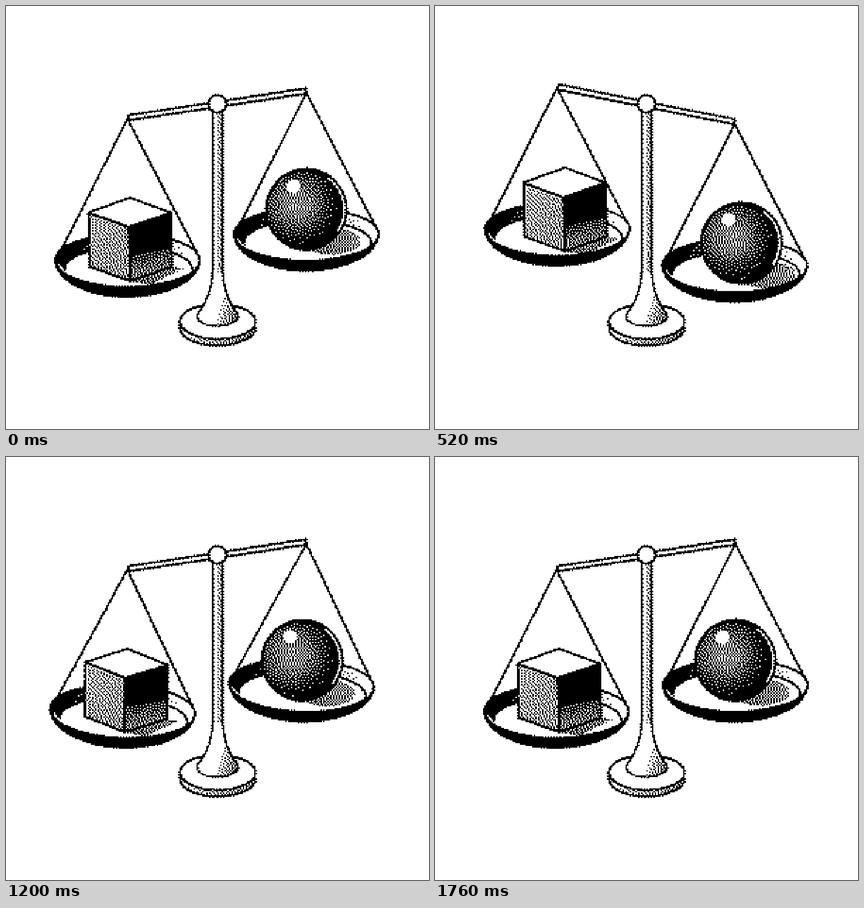
An HTML page with a canvas that plays this animation: 748 by 748 pixels, repeating every 2.12 s.

```html
<!DOCTYPE html>
<html lang="en">
<head>
<meta charset="utf-8">
<title>Balance scale</title>
<style>
  html, body { margin: 0; width: 100%; height: 100%; overflow: hidden; background: #fff; }
  canvas { display: block; width: 100vw; height: 100vh; image-rendering: pixelated; }
</style>
</head>
<body>
<canvas id="stage" width="300" height="300"></canvas>
<script>
const STAGE = 748, SIZE = 300, LOOP = 2120, STEP = 40, REST = 1760;
const HUB = { x: 374, y: 174 }, ARM = 159, DROP = 253, LINE = 3.9;
const ctx = document.getElementById('stage').getContext('2d', { willReadFrequently: true });
const TAU = Math.PI * 2, RAD = Math.PI / 180;

const clamp = v => Math.min(1, Math.max(0, v));
const ease = (t, from, to) => 0.5 - 0.5 * Math.cos(Math.PI * clamp((t - from) / (to - from)));

// Beam tilt and pan swing in degrees; slide and sink of the loads from 0 to 1.
function pose(t) {
  return {
    tilt: 8.7 - 19.9 * (ease(t, 0, 500) - ease(t, 620, 1200)),
    swing: -3.1 * ease(t, 700, 1120) + 6 * ease(t, 1120, 1400) - 2.9 * ease(t, 1400, REST),
    slide: ease(t, 0, 420) - ease(t, 720, 920),
    sink: ease(t, 360, 720) - ease(t, 930, 1200)
  };
}

// Samples a tone function (0 black, 1 white) along a gradient.
function shade(gradient, tone) {
  for (let i = 0; i <= 10; i++) {
    const v = Math.round(255 * clamp(tone(i / 10)));
    gradient.addColorStop(i / 10, `rgb(${v},${v},${v})`);
  }
  return gradient;
}
const linear = (x0, y0, x1, y1, tone) => shade(ctx.createLinearGradient(x0, y0, x1, y1), tone);

function paint(fill, width, stroke = '#000') {
  if (fill) { ctx.fillStyle = fill; ctx.fill(); }
  if (width) { ctx.strokeStyle = stroke; ctx.lineWidth = width; ctx.stroke(); }
}

function ellipse(x, y, rx, ry, fill, width) {
  ctx.beginPath();
  ctx.ellipse(x, y, rx, ry, 0, 0, TAU);
  paint(fill, width);
}

function arc(x, y, rx, ry, from, to, width) {
  ctx.beginPath();
  ctx.ellipse(x, y, rx, ry, 0, from, to);
  paint(null, width, '#fff');
}

function poly(points, fill, width) {
  ctx.beginPath();
  points.forEach(p => ctx.lineTo(p.x, p.y));
  ctx.closePath();
  paint(fill, width);
}

function string(x, y) {
  ctx.beginPath();
  ctx.moveTo(0, -DROP + 3);
  ctx.lineTo(x, y);
  paint(null, LINE);
}

function drawStand() {
  const x = 374.5;
  ctx.beginPath();
  ctx.ellipse(x, 570, 67, 31, 0, 0, Math.PI);
  ctx.lineTo(x - 67, 558);
  ctx.lineTo(x + 67, 558);
  paint(linear(x - 67, 0, x + 67, 0, s => 0.85 - 0.45 * s), LINE);
  ellipse(x, 558, 67, 31, '#fff', LINE);

  // Column with flared foot
  ctx.beginPath();
  ctx.moveTo(x - 9, 188);
  ctx.lineTo(x - 9, 468);
  ctx.bezierCurveTo(x - 10, 505, x - 24, 530, x - 35, 543);
  ctx.bezierCurveTo(x - 49, 574, x + 49, 574, x + 35, 543);
  ctx.bezierCurveTo(x + 24, 530, x + 10, 505, x + 9, 468);
  ctx.lineTo(x + 9, 188);
  ctx.closePath();
  ctx.save();
  ctx.clip();
  ctx.fillStyle = linear(x - 4, 0, x + 11, 0, s => 1 - 0.7 * s);
  ctx.fillRect(x - 15, 180, 30, 292);
  ctx.fillStyle = linear(x - 4, 545, x + 36, 556, s => 1 - 0.75 * s);
  ctx.fillRect(x - 45, 472, 90, 100);
  ctx.restore();
  paint(null, 3.4);
}

function drawBeam(tilt) {
  ctx.save();
  ctx.translate(HUB.x, HUB.y);
  ctx.rotate(-tilt * RAD);
  ctx.beginPath();
  ctx.rect(-ARM, -4.5, ARM * 2, 9);
  paint('#fff', LINE);
  ctx.restore();
  ellipse(HUB.x, 173, 16, 16, '#fff', LINE);
}

function drawPan(shadow) {
  string(-117, -19);
  string(123, -13);
  ctx.beginPath();
  ctx.ellipse(0, 0, 129, 66, 0, 0, Math.PI);
  paint('#000');
  ellipse(0, 0, 128, 47, linear(-129, 0, 129, 0, s => 1.3 * s - 0.2));
  ctx.save();
  ctx.clip();
  ellipse(2, 16, 113, 40, '#fff', LINE);
  ctx.clip();
  shadow();
  ctx.restore();
  ellipse(0, 0, 128, 47, null, LINE);
  arc(0, 0, 123, 45, 2.6, 3, 2.5);
}

// Cube corner: a and b step along the two base edges, h goes up.
const corner = (a, b, h) => ({ x: 3 + 74 * a - 72 * b - 2 * h, y: 38 - 26 * (a + b) - 96 * h });

const cube = {
  slide: 9, sink: 5, x: 2, y: -1,
  shadow() {
    poly([corner(0, 0, 0), corner(1, 0, 0), { x: 99, y: 14 }, { x: 40, y: 44 }],
      linear(4, 0, 98, 0, s => 0.3 + 0.18 * s));
  },
  draw() {
    const face = (side, fill) => poly(side.map(c => corner(...c)), fill, LINE);
    face([[0, 0, 0], [0, 1, 0], [0, 1, 1], [0, 0, 1]], linear(-71, -70, 4, 10, s => 0.7 - 0.14 * s));
    face([[0, 0, 0], [1, 0, 0], [1, 0, 1], [0, 0, 1]],
      linear(28, -16, 38, 32, s => 0.48 * Math.sqrt(s)));
    face([[0, 0, 1], [1, 0, 1], [1, 1, 1], [0, 1, 1]], '#fff');
  }
};

const ball = {
  slide: 12, sink: 10, x: 0, y: -2,
  shadow() {
    ellipse(44, 14, 52, 24, linear(-8, 0, 96, 0, s => 0.3 + 0.28 * s));
  },
  draw() {
    const light = ctx.createRadialGradient(-18, -52, 0, -18, -52, 82);
    ellipse(0, -42, 71.5, 72, shade(light, s => 0.56 * (1 - s * s) ** 2), LINE);
    arc(0, -42, 67.5, 68.5, -0.95, 0.6, 3.4);
    ellipse(-23, -83, 12, 12, '#fff');
  }
};

// Hangs a pan from one end of the beam; the load rests on it.
function hang(side, load, p) {
  const tilt = p.tilt * RAD;
  const x = load.x + load.slide * p.slide, y = load.y + load.sink * p.sink;
  ctx.save();
  ctx.translate(HUB.x + side * ARM * Math.cos(tilt), HUB.y - side * ARM * Math.sin(tilt));
  ctx.rotate(-p.swing * RAD);
  ctx.translate(side - 1, DROP + side);
  drawPan(() => { ctx.translate(x, y); load.shadow(); });
  ctx.translate(x, y);
  load.draw();
  ctx.restore();
}

// One-bit stipple by error diffusion.
function stipple() {
  const image = ctx.getImageData(0, 0, SIZE, SIZE), px = image.data;
  const tone = new Float32Array(SIZE * (SIZE + 1) + 1);
  for (let i = 0; i < SIZE * SIZE; i++) tone[i] = px[i * 4];
  for (let i = 0; i < SIZE * SIZE; i++) {
    const v = tone[i] < 128 ? 0 : 255, err = (tone[i] - v) / 16;
    tone[i + 1] += err * 7;
    tone[i + SIZE - 1] += err * 3;
    tone[i + SIZE] += err * 5;
    tone[i + SIZE + 1] += err;
    px[i * 4] = px[i * 4 + 1] = px[i * 4 + 2] = v;
  }
  ctx.putImageData(image, 0, 0);
}

function draw(t) {
  const p = pose(t);
  ctx.setTransform(1, 0, 0, 1, 0, 0);
  ctx.fillStyle = '#fff';
  ctx.fillRect(0, 0, SIZE, SIZE);
  ctx.scale(SIZE / STAGE, SIZE / STAGE);
  ctx.lineJoin = 'round';
  drawStand();
  drawBeam(p.tilt);
  hang(-1, cube, p);
  hang(1, ball, p);
  stipple();
}

const start = performance.now();
let shown = -1;
function tick() {
  const t = (performance.now() - start) % LOOP;
  const step = Math.min(REST, Math.floor(t / STEP) * STEP);
  if (step !== shown) draw(shown = step);
  requestAnimationFrame(tick);
}
tick();
</script>
</body>
</html>
```
